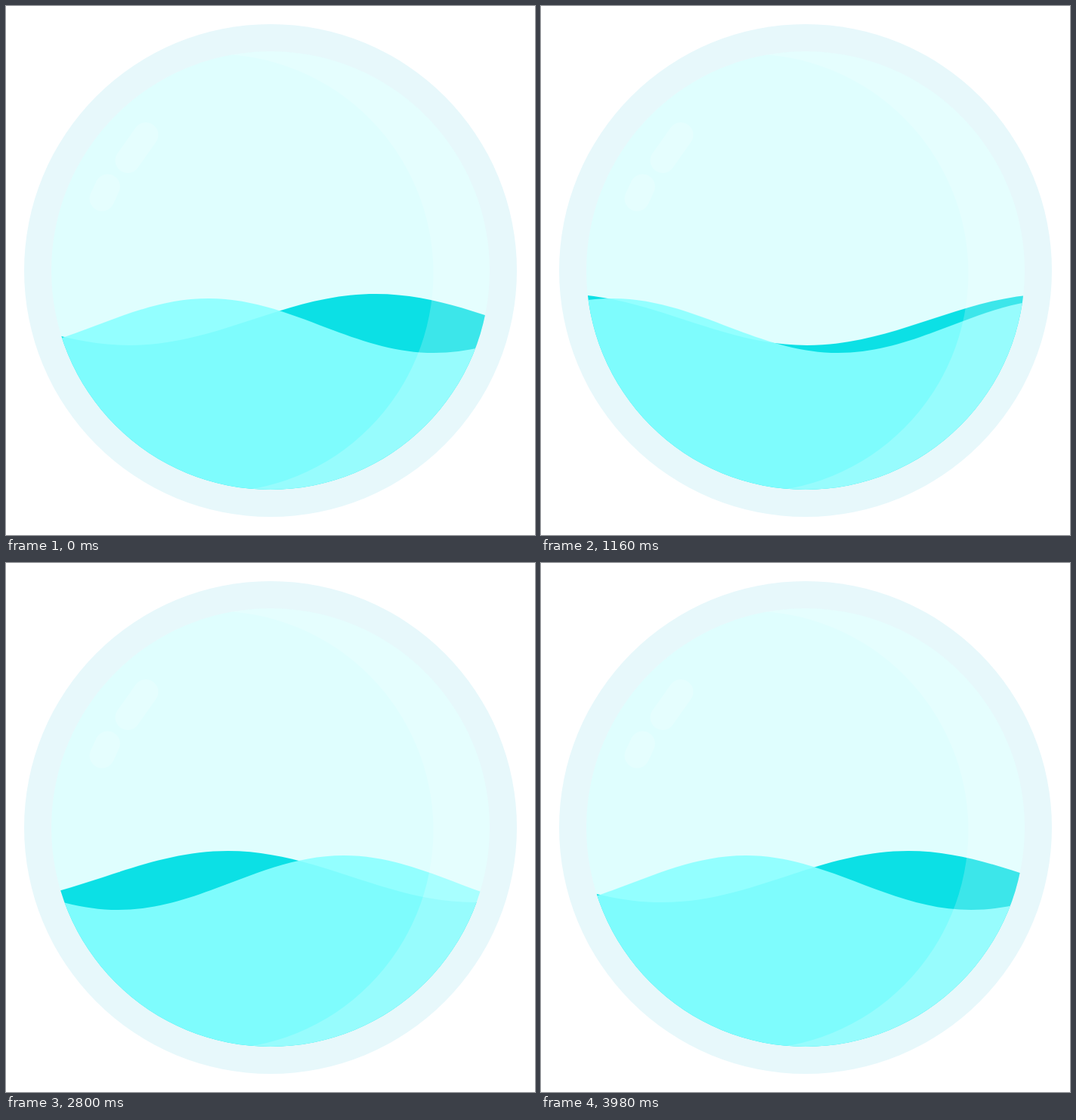
Recreate the animation shown at these times as an HTML page without scripts. Size 700 by 700 pixels, loop 4 s.

```html
<!DOCTYPE html>
<html lang="en">
<head>
<meta charset="utf-8">
<title>Water globe</title>
<style>
  html, body { margin: 0; width: 100%; height: 100%; overflow: hidden; background: #fff; }
  svg { display: block; width: 100%; height: 100%; }
  .ring { fill: #e7f8fb; }
  .glass { fill: #dffefe; }
  .back { fill: #0ce0e5; animation: drift 4s linear infinite; --shift: 652px; }
  .front { fill: #8bffff; fill-opacity: .9; animation: drift 4s linear infinite; --shift: -597px; }
  .shine { fill: #fff; fill-opacity: .2; }
  .glint { stroke: #fff; stroke-opacity: .2; stroke-width: 33; stroke-linecap: round; }
  @keyframes drift { to { transform: translateX(var(--shift)); } }
</style>
</head>
<body>
<svg viewBox="0 0 700 700">
  <defs>
    <clipPath id="bowl"><circle cx="350" cy="350" r="290"/></clipPath>
    <mask id="crescent" maskUnits="userSpaceOnUse" x="0" y="0" width="700" height="700">
      <rect width="700" height="700" fill="#fff"/>
      <circle cx="275.5" cy="353.5" r="290"/>
    </mask>
  </defs>

  <circle class="ring" cx="350" cy="350" r="326"/>
  <circle class="glass" cx="350" cy="350" r="290"/>

  <!-- each wave spans three periods and drifts by one per loop -->
  <g clip-path="url(#bowl)">
    <path class="back" d="M-815 381
      c118.7 0 207.3 68 326 68 s207.3-68 326-68
      s207.3 68 326 68 s207.3-68 326-68
      s207.3 68 326 68 s207.3-68 326-68
      V700 H-815z"/>
    <path class="front" d="M-329 387
      c108.7 0 189.8 72 298.5 72 s189.8-72 298.5-72
      s189.8 72 298.5 72 s189.8-72 298.5-72
      s189.8 72 298.5 72 s189.8-72 298.5-72
      V700 H-329z"/>
  </g>

  <circle class="shine" cx="350" cy="350" r="290" mask="url(#crescent)"/>
  <path class="glint" d="M185 170.500L161 204.500"/>
  <path class="glint" d="M134.500 239L127 255"/>
</svg>
</body>
</html>
```
